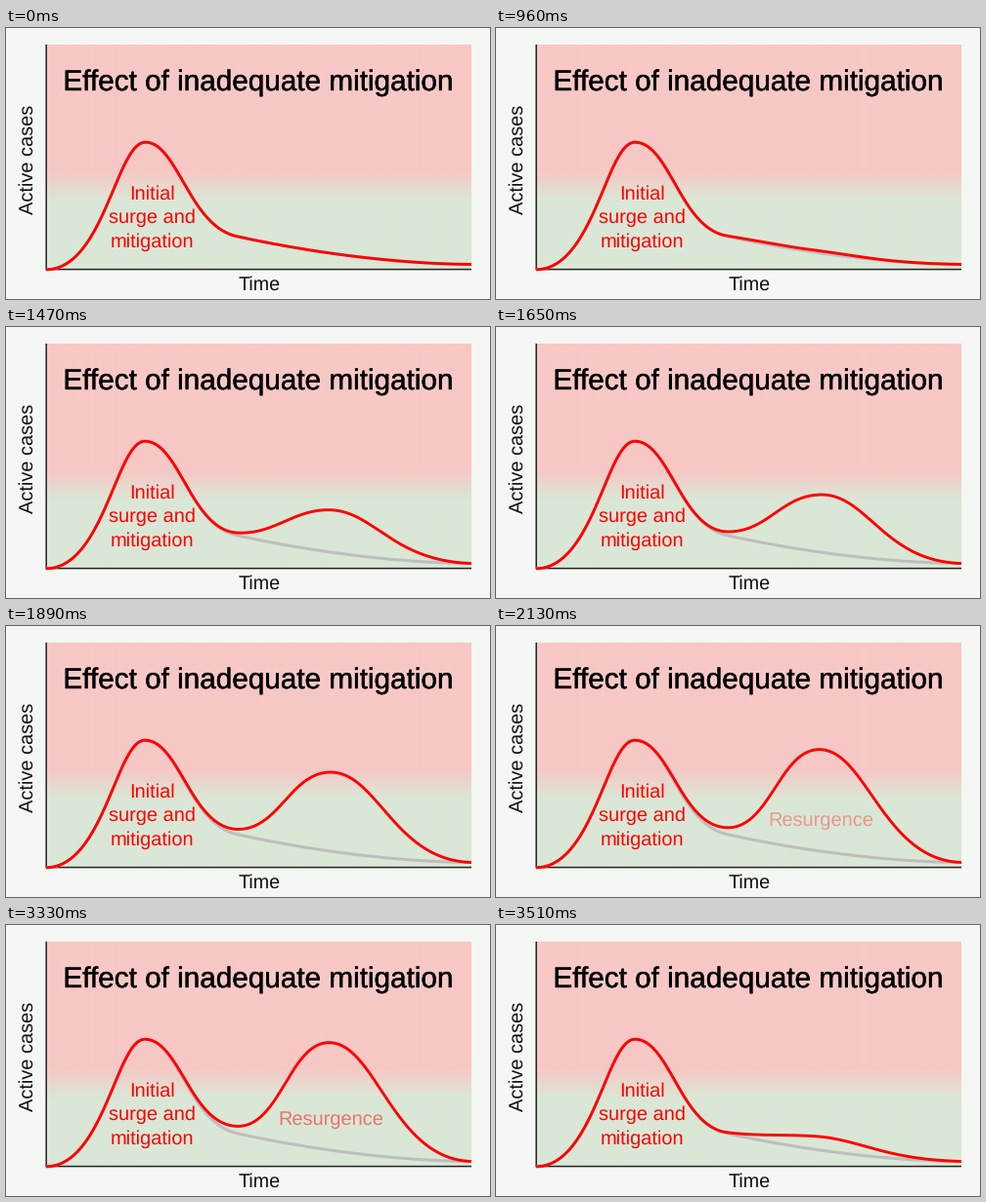
Write a matplotlib script that moves like this. It is 495 px wide and 278 px high and loops after 3.54 s.

```python
import numpy as np
import matplotlib.pyplot as plt
from matplotlib.animation import FuncAnimation
from matplotlib.colors import to_rgb
from matplotlib.patheffects import withStroke

W, H, DPI = 495, 278, 64
PT = 72 / DPI  # points per pixel
FRAMES, INTERVAL = 118, 30
HOLD, STEPS, BACK = 31, 48, 8  # still frames, steps up, steps down
LEFT, RIGHT, TOP, BASE = 41, 476, 17, 248
PINK, GREEN, RED = "#f7c8c5", "#dae7d6", "#ff0000"

plt.rcParams["font.family"] = "Liberation Sans"
plt.rcParams["text.hinting"] = "none"

fig = plt.figure(figsize=(W / DPI, H / DPI), dpi=DPI, facecolor="#f4f7f3")
ax = fig.add_axes([0, 0, 1, 1])
ax.axis("off")


def label(x, y, text, size=20, color="black", **kw):
    return ax.text(x, y, text, size=size * PT, color=color, ha="center",
                   va="baseline", rotation_mode="anchor", zorder=5, **kw)


def bezier(p0, p1, p2, p3, n=50):
    t = np.linspace(0, 1, n)[:, None]
    p0, p1, p2, p3 = map(np.array, (p0, p1, p2, p3))
    return ((1 - t)**3 * p0 + 3 * t * (1 - t)**2 * p1
            + 3 * t**2 * (1 - t) * p2 + t**3 * p3)


def first_wave(peak_x, low, slope, lead, handle):
    peak = (peak_x, 117.2)
    return [bezier((LEFT, 247.8), (100, 247.8), (113, 117.2), peak),
            bezier(peak, (peak_x + lead, 117.2),
                   (low[0] - handle, low[1] - slope * handle), low)]


def decline():
    low = (236, 213.7)
    return np.vstack(first_wave(142.5, low, 0.22, 33, 49)
                     + [bezier(low, (305, 229), (395, 242), (RIGHT, 242.5))])


KEYS = [0, 11, 24, 32, 48]


def resurgence(k):
    """Curve after k of the rising steps."""
    def at(*values):
        return np.interp(k, KEYS, values)

    low = (at(236, 237, 237.5, 237.5, 237),
           at(213.2, 212.5, 210, 208.5, 205.2))
    slope = at(0.17, 0.08, 0, 0, 0)
    peak = (at(325, 326, 333, 332, 329.5),
            230 - 2.167 * k - 0.0104 * k * k)
    tilt = at(0.14, 0, 0, 0, 0)
    rise = at(30, 34, 41, 42, 44)
    lead = at(30, 32, 41, 41, 40)
    fall = at(48, 46, 47, 48, 48)
    tail = (at(400, 390, 397, 397, 395), at(241.5, 239.5, 240.5, 240.5, 240.5))
    return np.vstack(first_wave(141.9, low, slope, 36, 48) + [
        bezier(low, (low[0] + rise, low[1] + slope * rise),
               (peak[0] - lead, peak[1] - tilt * lead), peak),
        bezier(peak, (peak[0] + fall, peak[1] + tilt * fall),
               tail, (RIGHT, 242.5))])


# Background fading from pink to green
rows = np.linspace(TOP, BASE, 462)
mix = np.clip((rows - 147) / 30, 0, 1)[:, None, None]
shade = (1 - mix) * np.array(to_rgb(PINK)) + mix * np.array(to_rgb(GREEN))
ax.imshow(shade, extent=[LEFT, RIGHT, BASE, TOP], aspect="auto", zorder=0)
ax.set(xlim=(0, W), ylim=(H, 0))

ax.plot([LEFT + 0.2, LEFT + 0.2, RIGHT], [TOP, BASE - 0.4, BASE - 0.4],
        color="#222222", lw=1.5 * PT, solid_joinstyle="miter",
        solid_capstyle="butt", snap=False, zorder=1)

label(258.3, 64, "Effect of inadequate mitigation", 29.7,
      path_effects=[withStroke(linewidth=0.4 * PT, foreground="black")])
label(259, 269, "Time", 19.7, "#111111")
label(28, 134.5, "Active cases", color="#111111", rotation=90)
for y, text in [(176, "Initial"), (200, "surge and"), (225, "mitigation")]:
    label(149, y, text, color=RED)
second = label(332.6, 205, "Resurgence", color=RED)

calm = decline()
ax.plot(*calm.T, color="#bebebe", lw=3 * PT, solid_capstyle="butt", zorder=2)
curve, = ax.plot([], [], color=RED, lw=2.9 * PT, solid_capstyle="butt",
                 zorder=3)


def progress(i):
    up = min(max(i - HOLD, 0), STEPS)
    down = max(i - (FRAMES - BACK), 0)
    return up - down * STEPS / BACK


def update(i):
    k = progress(i)
    # The last rising steps bring in the second label
    second.set_alpha(float(np.clip((k - 36) / 12, 0, 1)))
    curve.set_data(*(resurgence(k) if k > 0 else calm).T)
    return curve, second


anim = FuncAnimation(fig, update, frames=FRAMES, interval=INTERVAL,
                     repeat=True, repeat_delay=0, blit=False)
plt.show()
```
